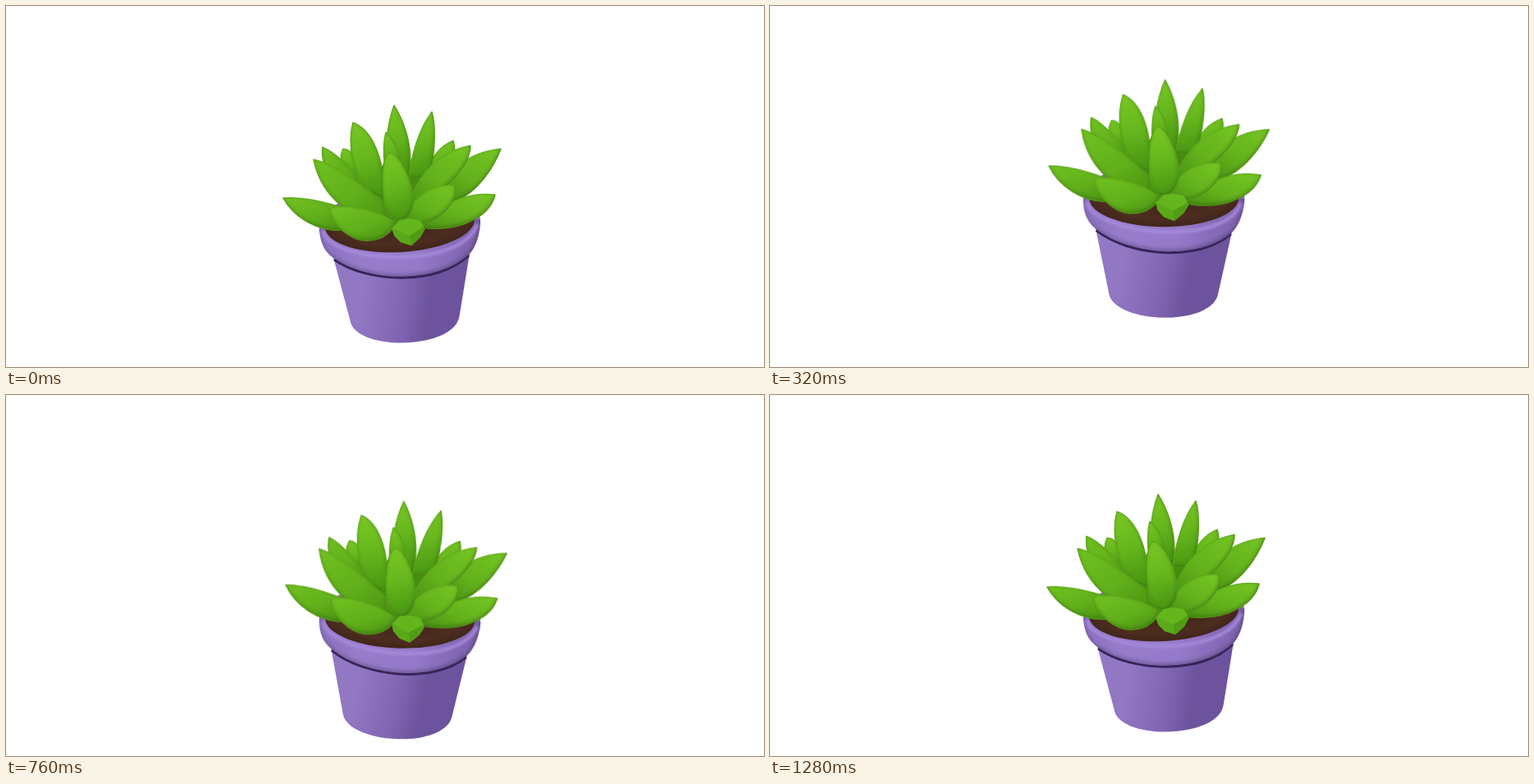
Write an HTML page that moves like this. It is 922x440 px and loops after 2.88 s.

```html
<!DOCTYPE html>
<html lang="en">
<head>
<meta charset="utf-8">
<title>Hopping plant</title>
<style>
  html, body { margin: 0; width: 100%; height: 100%; overflow: hidden; background: #fff; }
  svg { display: block; width: 922px; height: 440px; }
  .leaf { stroke: #65b31c; stroke-width: 1.2; stroke-linejoin: round; filter: url(#round); }
  .up { fill: url(#up); }
  .left { fill: url(#left); }
  .right { fill: url(#right); }
</style>
</head>
<body>
<svg viewBox="0 0 922 440">
  <defs>
    <linearGradient id="up" x1="0" y1="0" x2=".15" y2="1">
      <stop offset="0" stop-color="#78c724"/><stop offset=".5" stop-color="#67b81d"/><stop offset="1" stop-color="#4a9813"/>
    </linearGradient>
    <linearGradient id="left" x1=".1" y1="0" x2=".9" y2="1">
      <stop offset="0" stop-color="#6fc020"/><stop offset=".55" stop-color="#61b01b"/><stop offset="1" stop-color="#4a9512"/>
    </linearGradient>
    <linearGradient id="right" x1=".9" y1="0" x2=".1" y2="1">
      <stop offset="0" stop-color="#73c422"/><stop offset=".55" stop-color="#63b21c"/><stop offset="1" stop-color="#489212"/>
    </linearGradient>
    <linearGradient id="body" x1="398" x2="564" y1="0" y2="24" gradientUnits="userSpaceOnUse">
      <stop offset="0" stop-color="#8265b2"/><stop offset=".2" stop-color="#9378c3"/>
      <stop offset=".5" stop-color="#9277c3"/><stop offset=".8" stop-color="#8266b3"/><stop offset="1" stop-color="#6d539d"/>
    </linearGradient>
    <linearGradient id="rim" x1="381" x2="577" y1="0" y2="0" gradientUnits="userSpaceOnUse">
      <stop offset="0" stop-color="#8a6ebd"/><stop offset=".25" stop-color="#987ccb"/>
      <stop offset=".6" stop-color="#967aca"/><stop offset="1" stop-color="#7a5eab"/>
    </linearGradient>
    <radialGradient id="soil" cx=".5" cy=".45" r=".55">
      <stop offset="0" stop-color="#3a2017"/><stop offset=".75" stop-color="#4d2d20"/><stop offset="1" stop-color="#41251a"/>
    </radialGradient>
    <!-- soft shade along the lower right inside edge -->
    <filter id="round" color-interpolation-filters="sRGB">
      <feComponentTransfer in="SourceAlpha"><feFuncA type="table" tableValues="1 0"/></feComponentTransfer>
      <feGaussianBlur stdDeviation="2.6"/>
      <feOffset dx="-1.5" dy="-2.5" result="edge"/>
      <feFlood flood-color="#000" flood-opacity=".26"/>
      <feComposite in2="edge" operator="in"/>
      <feComposite in2="SourceAlpha" operator="in" result="shade"/>
      <feMerge><feMergeNode in="SourceGraphic"/><feMergeNode in="shade"/></feMerge>
    </filter>
    <filter id="soft"><feGaussianBlur stdDeviation="1.6"/></filter>
  </defs>

  <g id="plant">
    <!-- pot -->
    <path d="M397.5 304L418.5 383C424 421.5 545 419.5 551.5 378L564 301Z" fill="url(#body)"/>
    <path d="M399 309C440 338 525 341 563 304" fill="none" stroke="#372459" stroke-width="3"/>
    <ellipse cx="479" cy="266" rx="98" ry="45" transform="rotate(-3.3 479 266)" fill="#8669b8"/>
    <path d="M381 271C382 292 390 301 398 307C440 336 525 339 564 302C573 292 577 275 577 260Z" fill="url(#rim)" filter="url(#round)"/>
    <path d="M386 275C395 314 555 322 573 266" fill="none" stroke="#a68adb" stroke-width="4" filter="url(#soft)"/>
    <ellipse cx="479" cy="265" rx="91" ry="35" transform="rotate(-3.3 479 265)" fill="url(#soil)"/>

    <!-- back leaves -->
    <path d="M460 190H505L515 225L540 245L500 268H468L430 250Z" fill="#458c12"/>
    <path class="leaf up" d="M410 174C420 174 428 185 430 210L412 205C406 192 406 182 410 174Z"/>
    <path class="leaf up" d="M544 164C549 180 545 195 522 215L508 210C516 185 528 170 544 164Z"/>
    <path class="leaf up" d="M472 121C482 136 496 168 491 205L468 205C458 180 464 142 472 121Z"/>
    <path class="leaf up" d="M518 129C523 145 523 180 514 210L490 210C493 180 503 148 518 129Z"/>
    <path class="leaf right" d="M602 174C594 195 575 227 545 239L528 234C530 205 560 178 602 174Z"/>
    <path class="leaf left" d="M385 172C400 178 425 200 438 225L415 225C395 212 382 195 385 172Z"/>
    <path class="leaf up" d="M422 142C440 148 460 175 461 235L440 228C424 210 414 170 422 142Z"/>
    <path class="leaf up" d="M462 154C470 160 482 180 482 200L462 200C458 185 459 165 462 154Z"/>

    <!-- front leaves -->
    <path class="leaf right" d="M565 170C565 195 535 225 492 250L492 240C497 215 520 178 565 170Z"/>
    <path class="leaf left" d="M337 234C362 232 386 239 408 245L412 273C380 276 350 258 337 234Z"/>
    <path class="leaf right" d="M595 230C590 252 560 275 512 271L500 258C530 250 550 225 595 230Z"/>
    <path class="leaf left" d="M374 187C400 192 435 220 460 240L464 263C425 264 384 236 374 187Z"/>
    <path class="leaf right" d="M546 219C549 235 535 262 494 269L484 262C490 240 515 215 546 219Z"/>
    <path class="leaf up" d="M466 179C474 178 490 200 495 230C497 248 490 260 478 263C466 260 460 245 459 225C457 205 459 184 466 179Z"/>
    <path class="leaf left" d="M393 247C410 241 450 248 472 263C474 272 460 285 442 286C420 288 397 268 393 247Z"/>

    <!-- bud -->
    <path d="M469 271L478 261L490 259L503 261L510 271L504 282L493 292L480 288L472 280Z" fill="#59a919"/>
    <path d="M471 271L479 261L490 259L503 261L508 269L491 280Z" fill="#64b61d"/>
    <path d="M508 269L510 271L504 282L493 292L491 280Z" fill="#4f9d15"/>
  </g>
</svg>
<script>
  const LOOP = 2880, STEP = 40;
  const plant = document.getElementById('plant');

  const fall = (t, a, b, from, to) => from + (to - from) * ((t - a) / (b - a)) ** 2;
  const rise = (t, a, b, from, to, pow) => to + (from - to) * ((b - t) / (b - a)) ** pow;

  // two hops, then a landing
  function height(t) {
    if (t < 120) return fall(t, 0, 120, 0, 18);
    if (t < 535) return rise(t, 120, 535, 18, -46.5, 2.15);
    if (t < 680) return fall(t, 535, 680, -46.5, 23);
    if (t < 1100) return rise(t, 680, 1100, 23, -26, 1.63);
    if (t < 1280) return fall(t, 1100, 1280, -26, 0);
    return 0;
  }

  const sway = [[540, 6.7], [600, 6.4], [760, 4.6], [920, 3.1], [1080, 0.85], [1160, 0.3], [1280, 0]];

  function tilt(t) {
    if (t < 540) {
      const k = Math.min(1, Math.max(0, (t - 110) / 420));
      return 6.7 * k * k * (3 - 2 * k);
    }
    const i = sway.findIndex(s => s[0] > t);
    if (i < 1) return 0;
    const [t0, a] = sway[i - 1], [t1, b] = sway[i];
    return a + (b - a) * (t - t0) / (t1 - t0);
  }

  const start = performance.now();

  function draw() {
    const now = Math.max(0, performance.now() - start) % LOOP;
    const t = Math.floor(now / STEP) * STEP;
    plant.setAttribute('transform', `translate(0 ${height(t).toFixed(2)}) rotate(${tilt(t).toFixed(2)} 480 268)`);
    requestAnimationFrame(draw);
  }
  draw();
</script>
</body>
</html>
```
